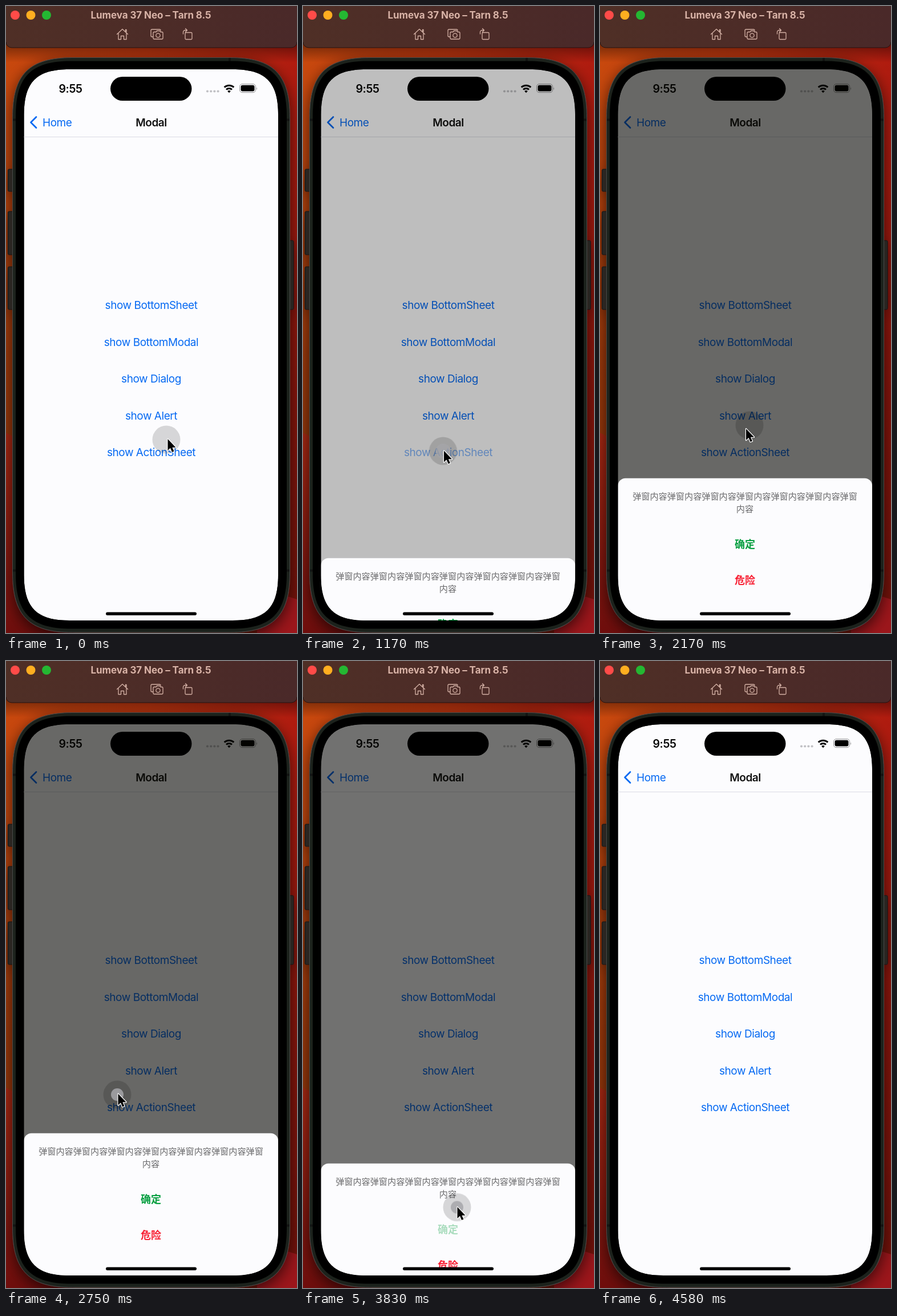
These frames come from a looping animation (510x1099 px, 5160 ms). An HTML page:

```html
<!DOCTYPE html>
<html lang="en">
<head>
<meta charset="utf-8">
<title>Action sheet demo</title>
<style>
html, body { margin: 0; width: 100%; height: 100%; overflow: hidden; background: #000; }
svg { display: block; width: 100vw; height: 100vh; }
text { font: 400 19px Inter, "Open Sans", sans-serif; letter-spacing: -.024em; }
.mid { text-anchor: middle; }
.bold { font-weight: 600; }
.link { fill: #0569f2; }
.title { font-size: 17px; font-weight: 700; letter-spacing: -.005em; fill: #d9b3a7; }
.clock { font-size: 19.5px; letter-spacing: -.02em; }
.icon { fill: none; stroke: #d3b0a4; stroke-width: 1.3; stroke-linejoin: round; stroke-linecap: round; }
.note, .choice { font-family: "Noto Sans CJK SC", "Noto Sans CJK", sans-serif; letter-spacing: 0; text-anchor: middle; }
.note { font-size: 15.15px; fill: #6a6a6c; }
.choice { font-size: 18px; font-weight: 700; }

/* 62 ticks of 1/12 s; poses hold between ticks */
.anim { animation: 5160ms step-end -4ms infinite; }
#touch { animation-name: touch; }
#arrow { animation-name: arrow; }
#dot { animation-name: dot; }
#opener { animation-name: opener; }
#confirm { animation-name: confirm; }
#dim { animation-name: dim; }
#sheet { animation-name: sheet; }

@keyframes touch {
  0% { translate: 281px 760px; animation-timing-function: steps(3); }
  4.84% { translate: 264px 783px; animation-timing-function: steps(2); }
  8.06% { translate: 249px 791px; animation-timing-function: steps(2); }
  11.29% { translate: 245.5px 782px; }
  12.9% { translate: 245.5px 780px; }
  29.03% { translate: 252px 779px; }
  30.64% { translate: 278px 762px; }
  32.26% { translate: 299px 718px; }
  33.87% { translate: 304px 697px; }
  35.48% { translate: 304px 697px; animation-timing-function: steps(4); }
  41.93% { translate: 262px 735px; animation-timing-function: steps(3); }
  46.77% { translate: 218px 768px; }
  48.39% { translate: 195px 760px; }
  58.06% { translate: 200px 775px; }
  59.68% { translate: 222px 850px; }
  61.29% { translate: 250px 920px; }
  62.9% { translate: 265.5px 950.5px; }
  64.51% { translate: 269px 955.5px; }
  66.13% { translate: 270px 957.5px; }
  83.87% { translate: 275px 962px; }
  85.48% { translate: 330px 1010px; }
  87.1% { translate: 469px 1085px; }
  88.71%, 100% { translate: 600px 1200px; }
}
@keyframes arrow {
  0% { translate: 283.5px 759px; animation-timing-function: steps(3); }
  4.84% { translate: 262px 786px; animation-timing-function: steps(2); }
  8.06% { translate: 248px 792px; animation-timing-function: steps(2); }
  11.29% { translate: 247px 780.5px; }
  12.9% { translate: 247px 779.5px; }
  29.03% { translate: 256px 776px; }
  30.64% { translate: 298.5px 715.5px; }
  32.26% { translate: 303px 699px; }
  33.87% { translate: 304.5px 696.5px; }
  35.48% { translate: 304.5px 696.5px; animation-timing-function: steps(4); }
  41.93% { translate: 256px 741px; animation-timing-function: steps(3); }
  46.77% { translate: 210px 765px; }
  48.39% { translate: 196.5px 758.5px; }
  58.06% { translate: 206px 800px; }
  59.68% { translate: 236px 888px; }
  61.29% { translate: 260px 938px; }
  62.9% { translate: 268px 954px; }
  66.13% { translate: 270.5px 957px; }
  83.87% { translate: 283px 968px; }
  85.48% { translate: 365px 1040px; }
  87.1% { translate: 485px 1105px; }
  88.71%, 100% { translate: 600px 1200px; }
}
@keyframes dot {
  0%, 25.81%, 59.68%, 79.03%, 100% { opacity: 0; scale: 1; }
  17.74%, 53.22%, 72.58% { opacity: .85; scale: 1; }
  22.58%, 56.45%, 75.8% { opacity: .75; scale: 1.18; }
  24.19%, 58.06%, 77.42% { opacity: .55; scale: 1.36; }
}
@keyframes opener {
  0%, 25.81%, 100% { opacity: 1; }
  17.74% { opacity: .6; }
  19.35% { opacity: .25; }
  22.58% { opacity: .5; }
  24.19% { opacity: .8; }
}
@keyframes confirm {
  0%, 79.03%, 100% { opacity: 1; }
  72.58% { opacity: .6; }
  74.19% { opacity: .33; }
  75.8% { opacity: .5; }
  77.42% { opacity: .8; }
}
@keyframes dim {
  0%, 80.64%, 100% { opacity: 0; }
  20.97% { opacity: .08; }
  22.58% { opacity: .25; }
  24.19% { opacity: .45; }
  25.81% { opacity: .56; }
  27.42% { opacity: .6; }
  74.19% { opacity: .56; }
  75.8% { opacity: .36; }
  77.42% { opacity: .13; }
  79.03% { opacity: .02; }
}
@keyframes sheet {
  0%, 80.64%, 100% { translate: 0 250px; }
  20.97% { translate: 0 225px; }
  22.58% { translate: 0 140px; }
  24.19% { translate: 0 53px; }
  25.81% { translate: 0 8px; }
  27.42% { translate: 0 0; }
  74.19% { translate: 0 53px; }
  75.8% { translate: 0 143px; }
  77.42% { translate: 0 219px; }
  79.03% { translate: 0 247px; }
}
</style>
</head>
<body>
<svg viewBox="0 0 510 1099" preserveAspectRatio="none">
  <defs>
    <linearGradient id="wall">
      <stop stop-color="#d24c0e"/><stop offset=".5" stop-color="#cf3a10"/><stop offset="1" stop-color="#b81c10"/>
    </linearGradient>
    <linearGradient id="shade" x2="0" y2="1">
      <stop offset=".06" stop-opacity=".45"/><stop offset=".09" stop-opacity=".05"/>
      <stop offset=".3" stop-opacity=".12"/><stop offset=".55" stop-opacity=".25"/>
      <stop offset="1" stop-opacity=".4"/>
    </linearGradient>
    <linearGradient id="hill" x2="0" y2="1">
      <stop stop-color="#a82812"/><stop offset="1" stop-color="#6e0d0c"/>
    </linearGradient>
    <linearGradient id="bar">
      <stop stop-color="#4f2f26"/><stop offset="1" stop-color="#4a2929"/>
    </linearGradient>
    <filter id="shadow" x="-20%" y="-10%" width="140%" height="120%">
      <feDropShadow dx="0" dy="8" stdDeviation="13" flood-opacity=".62"/>
    </filter>
    <path id="glass" d="M31.500 191c0-58 22-80 80-80H397c58 0 80 22 80 80V997c0 58-22 80-80 80H111.500c-58 0-80-22-80-80Z"/>
    <clipPath id="screen"><use href="#glass"/></clipPath>
  </defs>

  <rect width="510" height="1099" fill="url(#wall)"/>
  <rect width="510" height="1099" fill="url(#shade)"/>
  <path d="M0 748Q60 775 120 900V1099H0Z" fill="url(#hill)"/>
  <path d="M510 1040Q480 1030 440 1020V1099H510Z" fill="#9c161b"/>

  <g filter="url(#shadow)">
    <g fill="#292522" stroke="#171514">
      <rect x="3.500" y="286" width="10" height="39" rx="2"/>
      <rect x="3.500" y="360" width="10" height="76" rx="2"/>
      <rect x="3.500" y="457" width="10" height="75" rx="2"/>
      <rect x="494" y="411" width="10" height="121" rx="2"/>
    </g>
    <path d="M11.500 195.500c0-76 29-105 105-105H392.500c76 0 105 29 105 105V993c0 76-29 105-105 105H116.500c-76 0-105-29-105-105Z" fill="#1f201f" stroke="#4a4c4a"/>
  </g>
  <path d="M392 91v6M12 199.500h5M492 199.500h5M12 989.500h5M492 989.500h5" stroke="#131413" stroke-width="4"/>
  <path d="M17 193.500c0-70 27-97 97-97H395c70 0 97 27 97 97V994.500c0 70-27 97-97 97H114c-70 0-97-27-97-97Z"/>

  <path d="M0 0H510V63a10 10 0 0 1-10 10H10a10 10 0 0 1-10-10Z" fill="url(#bar)"/>
  <path d="M0 63a10 10 0 0 0 10 10H500a10 10 0 0 0 10-10" fill="none" stroke="#241312"/>
  <circle cx="16" cy="16" r="8" fill="#ff4b48"/>
  <circle cx="43.500" cy="16" r="8" fill="#ffae20"/>
  <circle cx="71" cy="16" r="8" fill="#24b732"/>
  <text class="title mid" x="254" y="22">Lumeva 37 Neo – Tarn 8.5</text>
  <g class="icon">
    <path d="M194.500 49.500L204 40.500L213.500 49.500M197 48V58.500H201.500V52.500H206.500V58.500H211V48M209.500 45V41.500H211V46"/>
    <path d="M257.500 54H256a2 2 0 0 1-2-2V43a2 2 0 0 1 2-2H269a2 2 0 0 1 2 2"/>
    <path d="M260 45.500H263L264.500 43.500H269.500L271 45.500H273a2 2 0 0 1 2 2V56a2 2 0 0 1-2 2H260a2 2 0 0 1-2-2V47.500a2 2 0 0 1 2-2Z"/>
    <circle cx="266.500" cy="51.500" r="3.600"/>
    <rect x="314" y="46.500" width="12" height="12" rx="1.500"/>
    <path d="M310.500 49V46a3.500 3.500 0 0 1 3.500-3.500H317M314.500 39.500L317.500 42.500L314.500 45.500"/>
  </g>

  <g clip-path="url(#screen)">
    <use href="#glass" fill="#fcfcfe"/>
    <path d="M31 229.500H477" stroke="#dadbe4" stroke-width="1.200"/>
    <text class="clock bold mid" x="113" y="151.500">9:55</text>
    <g fill="#c1c1c5">
      <circle cx="353" cy="149.500" r="2.100"/><circle cx="359.200" cy="149.500" r="2.100"/>
      <circle cx="365.400" cy="149.500" r="2.100"/><circle cx="371.600" cy="149.500" r="2.100"/>
    </g>
    <path d="M382.700 142.500a12 12 0 0 1 16.600 0M386 146.500a7.300 7.300 0 0 1 10 0" fill="none" stroke="#000" stroke-width="3"/>
    <path d="M388.200 149.200a4.300 4.300 0 0 1 5.600 0L391 152.200Z"/>
    <rect x="409.500" y="136.800" width="28" height="14.800" rx="4.500" fill="none" stroke="#8e8e90"/>
    <rect x="411.500" y="138.800" width="24" height="10.800" rx="3"/>
    <path d="M439 142v5q1.800-2.500 0-5Z" fill="#8e8e90"/>
    <path d="M53 194.500L43.500 204L53 213.500" fill="none" stroke="#0569f2" stroke-width="2.700" stroke-linecap="round" stroke-linejoin="round"/>
    <text class="link" x="64" y="211">Home</text>
    <text class="bold mid" x="254.500" y="211" fill="#111">Modal</text>
    <g class="link mid">
      <text x="254.500" y="531.300">show BottomSheet</text>
      <text x="254.500" y="595.900">show BottomModal</text>
      <text x="254.500" y="660.400">show Dialog</text>
      <text x="254.500" y="724.900">show Alert</text>
      <text id="opener" class="anim" x="254.500" y="789.400">show ActionSheet</text>
    </g>
    <rect id="dim" class="anim" x="31" y="111" width="446" height="966" fill="#050500"/>
    <g id="sheet" class="anim">
      <rect x="31.500" y="827.700" width="445.500" height="300" rx="13" fill="#fcfcfe"/>
      <text class="note" x="254" y="865">弹窗内容弹窗内容弹窗内容弹窗内容弹窗内容弹窗内容弹窗</text>
      <text class="note" x="254" y="886.500">内容</text>
      <text id="confirm" class="choice anim" x="254" y="950" fill="#089f41">确定</text>
      <text class="choice" x="254" y="1013" fill="#f81f33">危险</text>
    </g>
    <rect x="175" y="1062.500" width="159" height="5.500" rx="2.750"/>
  </g>
  <rect x="183" y="124" width="142.500" height="42" rx="21"/>

  <g id="touch" class="anim">
    <circle r="24.500" fill-opacity=".15"/>
    <circle id="dot" class="anim" r="11" fill="#a6a6aa"/>
  </g>
  <path id="arrow" class="anim" d="M0 0V20L4.500 15.800L7.600 23L10.900 21.600L7.900 14.700H14Z" stroke="#fff" stroke-width="2.400" paint-order="stroke" stroke-linejoin="round"/>
</svg>
</body>
</html>
```
